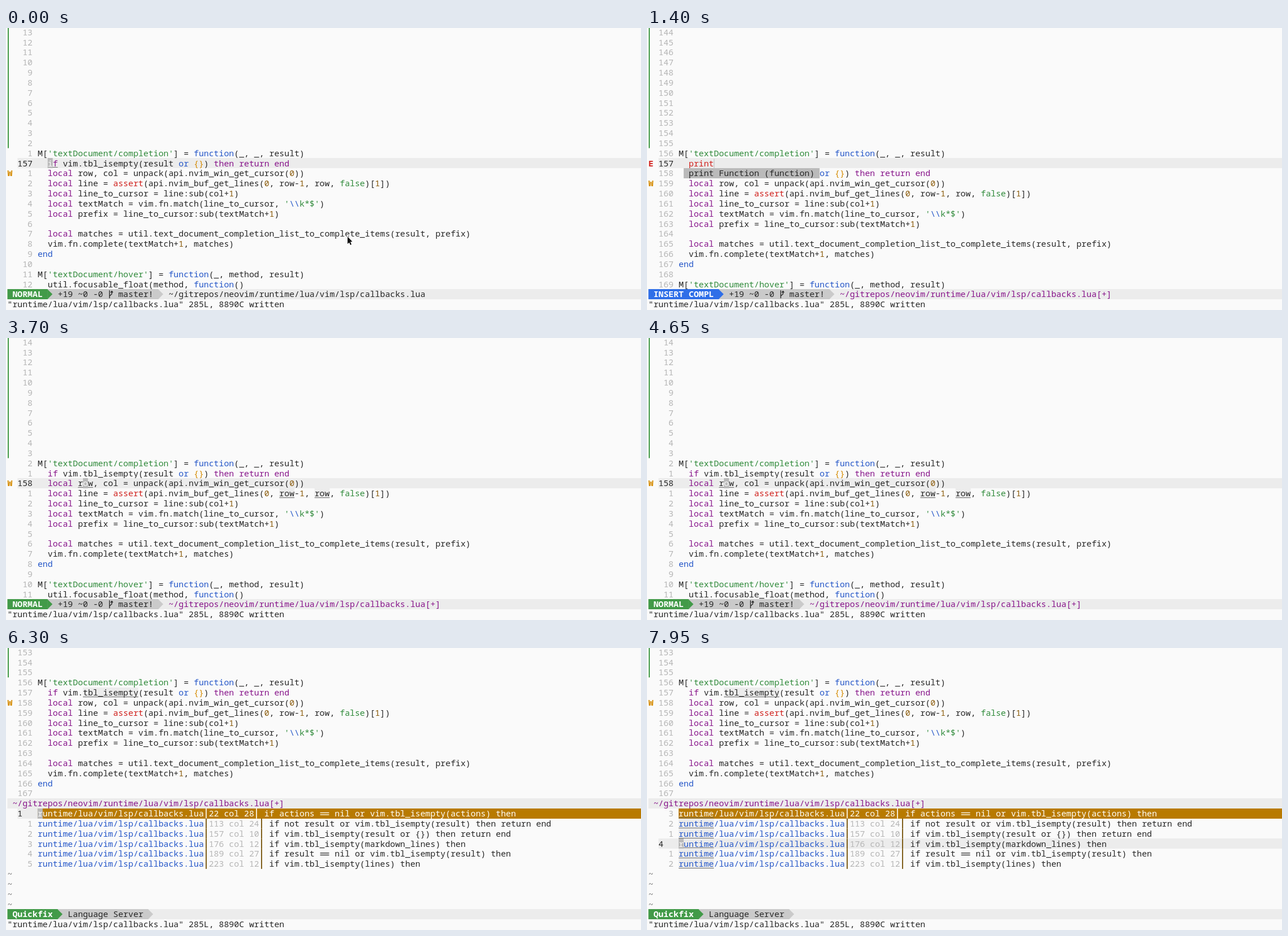
Write an HTML page with a canvas that moves like this. It is 1123 px wide and 499 px high and loops after 8000 ms.

```html
<!DOCTYPE html>
<html lang="en">
<head>
<meta charset="utf-8">
<title>Editor session</title>
<style>
  html, body { margin: 0; width: 100%; height: 100%; overflow: hidden; background: #fafafa; }
  canvas { display: block; }
</style>
</head>
<body>
<canvas id="stage" width="1123" height="499"></canvas>
<script>
const ctx = document.getElementById('stage').getContext('2d', { alpha: false });
const W = 1123, H = 499, CELL = 8.905, ROW = 17.83, TEXT = 6, LOOP = 8000;
const FONT = '14.84px "Noto Sans Mono", "DejaVu Sans Mono", monospace';
const C = {
  bg: '#fafafa', ink: '#262626', dim: '#b5b5b5', band: '#ececec', seg: '#cacaca', cursor: '#bababa',
  green: '#2f8a3a', mode: '#429a48', blue: '#2456c8', insert: '#2f6fe8', purple: '#87148a',
  red: '#d0201c', orange: '#d58a00', number: '#8a5a0a', gold: '#b87a00', bar: '#80601c'
};

const FIRST = 156;
const CODE = `M['textDocument/completion'] = function(_, _, result)
  if vim.tbl_isempty(result or {}) then return end
  local row, col = unpack(api.nvim_win_get_cursor(0))
  local line = assert(api.nvim_buf_get_lines(0, row-1, row, false)[1])
  local line_to_cursor = line:sub(col+1)
  local textMatch = vim.fn.match(line_to_cursor, '\\\\k*$')
  local prefix = line_to_cursor:sub(textMatch+1)

  local matches = util.text_document_completion_list_to_complete_items(result, prefix)
  vim.fn.complete(textMatch+1, matches)
end

M['textDocument/hover'] = function(_, method, result)
  util.focusable_float(method, function()`.split('\n');

const FILE = 'runtime/lua/vim/lsp/callbacks.lua';
const MATCHES = [
  ['22 col 28', 'if actions == nil or vim.tbl_isempty(actions) then'],
  ['113 col 24', 'if not result or vim.tbl_isempty(result) then return end'],
  ['157 col 10', 'if vim.tbl_isempty(result or {}) then return end'],
  ['176 col 12', 'if vim.tbl_isempty(markdown_lines) then'],
  ['189 col 27', 'if result == nil or vim.tbl_isempty(result) then'],
  ['223 col 12', 'if vim.tbl_isempty(lines) then']
];

// Each step changes part of the editor state at its time in ms.
const STEPS = [
  [0, { mode: 'NORMAL', line: 157, col: 2, word: 'if', added: 19, typed: null, mouse: true }],
  [100, { mode: 'INSERT', typed: '', word: '', mouse: false, modified: true }],
  [350, { typed: 'p' }],
  [500, { typed: 'pr' }],
  [650, { typed: 'pri' }],
  [900, { error: true }],
  [1400, { typed: 'print', mode: 'INSERT COMPL', menu: true }],
  [1700, { mode: 'NORMAL', menu: false, col: 6, word: 'print' }],
  [2250, { added: 20 }],
  [2500, { typed: null, error: false, changed: true, word: 'vim' }],
  [2850, { col: 8, word: '' }],
  [3000, { col: 9, word: 'tbl_isempty' }],
  [3100, { added: 19, changed: false }],
  [3350, { line: 158, word: 'row' }],
  [5050, { line: 157, word: 'tbl_isempty' }],
  [5900, { match: 1 }],
  [6400, { matchWord: 'runtime' }],
  [6750, { match: 2, matchWord: '' }],
  [6950, { match: 3 }],
  [7200, { match: 4 }],
  [7600, { matchWord: 'runtime' }]
];

const cellX = col => 2.5 + col * CELL;
const rowY = row => row * ROW - 1.4;

function box(row, col, cells, color) {
  ctx.fillStyle = color;
  const y = Math.round(rowY(row));
  ctx.fillRect(cellX(col), y, cells * CELL, Math.round(rowY(row + 1)) - y);
}

function put(row, col, text, color, weight = '') {
  ctx.font = weight + ' ' + FONT;
  ctx.fillStyle = color;
  const base = rowY(row) + 14.2;
  for (let i = 0; i < text.length; i++) {
    if (text.startsWith('==', i)) {
      ctx.fillRect(cellX(col + i) + 1, base - 7.2, CELL * 2 - 2, 1.3);
      ctx.fillRect(cellX(col + i) + 1, base - 3.7, CELL * 2 - 2, 1.3);
      i++;
    } else if (text[i] !== ' ') ctx.fillText(text[i], cellX(col + i), base);
  }
}

function arrow(row, col, color) {
  ctx.fillStyle = color;
  ctx.beginPath();
  ctx.moveTo(cellX(col) - .5, rowY(row));
  ctx.lineTo(cellX(col + 1) - .5, rowY(row) + ROW / 2);
  ctx.lineTo(cellX(col) - .5, rowY(row + 1));
  ctx.fill();
}

function changeBar(row, rows) {
  ctx.fillStyle = C.mode;
  ctx.fillRect(3, rowY(row), 2, rows * ROW);
}

function tokenColor(token, line) {
  if (/^(local|if|then|return)$/.test(token)) return C.purple;
  if (token === 'end') return line === 'end' ? C.blue : C.purple;
  if (/^(or|function|\\+)$/.test(token)) return C.blue;
  if (token === 'assert') return C.red;
  if (token === 'false') return C.green;
  if (/^\d+$/.test(token)) return C.number;
  if (/^[{}]$/.test(token)) return C.orange;
  return C.ink;
}

function putCode(row, line) {
  let quoted = false;
  for (const { 0: token, index } of line.matchAll(/\w+|\\+|[^\w\\]/g)) {
    const quote = token === "'";
    const inString = (quoted || quote) && token[0] !== '\\';
    put(row, TEXT + index, token, inString ? C.green : tokenColor(token, line));
    if (quote) quoted = !quoted;
  }
}

function wordMarks(row, line, word, fill, underline) {
  if (!word) return;
  for (const { index } of line.matchAll(new RegExp(`\\b${word}\\b`, 'g'))) {
    if (fill) box(row, TEXT + index, word.length, C.band);
    if (underline) {
      ctx.fillStyle = '#707070';
      ctx.fillRect(cellX(TEXT + index), Math.round(rowY(row) + 16), word.length * CELL, 1);
    }
  }
}

function lineNumber(row, number, current, relative) {
  if (number === current) put(row, 2, String(number), C.ink);
  else {
    const label = String(relative ? Math.abs(number - current) : number);
    put(row, 5 - label.length, label, C.dim);
  }
}

function blockCursor(row, col, char) {
  box(row, TEXT + col, 1, C.cursor);
  put(row, TEXT + col, char, C.bg);
}

function drawBuffer(s, firstLine, rows) {
  const active = !s.match, normal = s.mode === 'NORMAL';
  const lines = CODE.slice();
  if (s.typed !== null) lines.splice(1, 0, '  ' + s.typed);
  const warning = s.typed === null ? 158 : 159;

  changeBar(0, FIRST - firstLine);
  for (let row = 0; row < rows; row++) {
    const number = firstLine + row, line = lines[number - FIRST] || '';
    const current = active && number === s.line;
    if (current) box(row, 2, 130, C.band);
    lineNumber(row, number, active ? s.line : 0, active && normal);
    if (number === warning) put(row, 0, 'W', C.orange, 'bold');
    wordMarks(row, line, s.word, !current, false);
    if (s.typed !== null && number === 157) {
      put(row, TEXT, line, s.error ? C.red : C.ink);
      if (s.error) put(row, 0, 'E', C.red, 'bold');
    } else putCode(row, line);
    wordMarks(row, line, s.word, false, true);
    if (number === 157 && s.changed) changeBar(row, 1);
    if (current && normal) blockCursor(row, s.col, line[s.col]);
    if (current && !normal) {
      ctx.fillStyle = C.cursor;
      ctx.fillRect(cellX(TEXT + line.length), rowY(row) + 1, 1, ROW - 1);
    }
  }
  if (s.menu) {
    box(14, 7, 27, C.cursor);
    put(14, 8, 'print Function (function)', C.ink);
  }
}

function branchIcon(col) {
  const left = cellX(col) + 2.5, y = rowY(26);
  ctx.strokeStyle = C.ink;
  ctx.lineWidth = 1.4;
  ctx.beginPath();
  ctx.moveTo(left, y + 2);
  ctx.lineTo(left, y + 16);
  ctx.moveTo(left, y + 12);
  ctx.lineTo(left + 4, y + 8.5);
  ctx.lineTo(left + 4, y + 4);
  ctx.moveTo(left + 2, y + 6);
  ctx.lineTo(left + 4, y + 3.5);
  ctx.lineTo(left + 6, y + 6);
  ctx.stroke();
}

function statusLine(mode, modeColor, info) {
  const split = mode.length + 2, end = split + info.length + 3;
  box(26, 0, 130, C.band);
  box(26, split, info.length + 3, C.seg);
  arrow(26, end, C.seg);
  box(26, 0, split, modeColor);
  arrow(26, split, modeColor);
  put(26, 1, mode, '#fff', 'bold');
  put(26, split + 2, info, C.ink);
  return end + 2;
}

function drawQuickfix(s) {
  box(15, 0, 130, C.band);
  put(15, 1, `~/gitrepos/neovim/${FILE}[+]`, C.purple);
  MATCHES.forEach(([place, text], i) => {
    const row = 16 + i, chosen = i === 0, current = i + 1 === s.match;
    const placeCol = TEXT + FILE.length + 1, barCol = placeCol + place.length;
    if (current) box(row, 2, 130, C.band);
    if (chosen) box(row, TEXT, 130, C.gold);
    lineNumber(row, i + 1, s.match, true);
    wordMarks(row, FILE, s.matchWord, !chosen, false);
    put(row, TEXT, FILE, chosen ? '#fff' : C.blue);
    put(row, placeCol, place, chosen ? '#fff' : C.dim);
    put(row, barCol + 2, text, chosen ? '#fff' : C.ink);
    wordMarks(row, FILE, s.matchWord, false, true);
    ctx.fillStyle = chosen ? '#f4e8d0' : C.bar;
    for (const col of [placeCol - 1, barCol]) ctx.fillRect(Math.round(cellX(col) + 3.5), rowY(row), 2, ROW);
    if (current) blockCursor(row, 0, FILE[0]);
  });
  for (let row = 22; row < 26; row++) put(row, 0, '~', '#777');
  statusLine('Quickfix', C.mode, 'Language Server');
}

function drawPointer() {
  ctx.beginPath();
  [[604, 369], [604, 382], [607, 379.5], [609, 384], [611, 383], [609, 378.5], [612.5, 378]]
    .forEach(p => ctx.lineTo(...p));
  ctx.closePath();
  ctx.strokeStyle = '#fff';
  ctx.lineWidth = 2;
  ctx.stroke();
  ctx.fillStyle = '#111';
  ctx.fill();
}

function draw(time) {
  const s = Object.assign({}, ...STEPS.filter(([at]) => at <= time).map(([, change]) => change));
  ctx.fillStyle = C.bg;
  ctx.fillRect(0, 0, W, H);
  if (s.match) {
    drawBuffer(s, 153, 15);
    drawQuickfix(s);
  } else {
    drawBuffer(s, 144, 26);
    const normal = s.mode === 'NORMAL';
    const pathCol = statusLine(s.mode, normal ? C.mode : C.insert, `+${s.added} ~0 -0   master!`);
    branchIcon(s.mode.length + 14);
    put(26, pathCol, `~/gitrepos/neovim/${FILE}${s.modified ? '[+]' : ''}`, s.modified ? C.purple : C.ink);
  }
  put(27, 0, `"${FILE}" 285L, 8890C written`, C.ink);
  if (s.mouse) drawPointer();
}

const startTime = performance.now();
function tick() {
  draw((performance.now() - startTime) % LOOP);
  requestAnimationFrame(tick);
}
tick();
</script>
</body>
</html>
```
